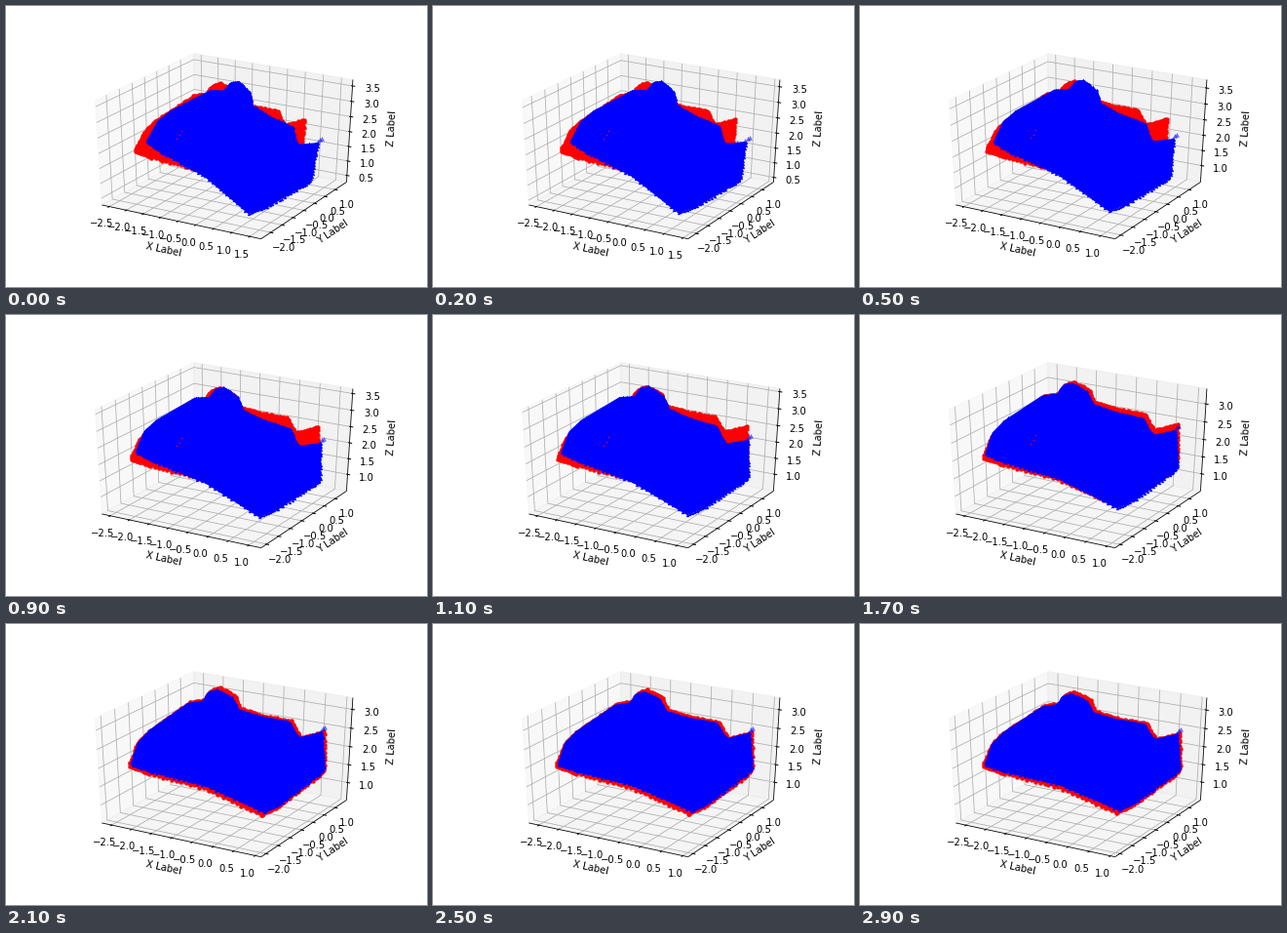
Recreate the animation shown at these times as a matplotlib script. Size 432 by 288 pixels, loop 3 s.

```python
import numpy as np
import matplotlib.pyplot as plt
from matplotlib.animation import FuncAnimation

W, H, FRAMES = 432, 288, 30
ALIGNED = 21  # step at which both clouds lie on each other

fig = plt.figure(figsize=(W / 72, H / 72), dpi=72, facecolor="white")
ax = fig.add_axes([0, 0, 1, 1])

# Axis limits (low, high) at a few steps
STEPS = [0, 5, ALIGNED, 29]
LIMITS = [
    ([-2.63, -2.63, -2.67, -2.68], [1.72, 1.27, 1.06, 1.03]),
    ([-2.34, -2.16, -2.12, -2.12], [1.49, 1.47, 1.46, 1.46]),
    ([0.335, 0.51, 0.555, 0.535], [3.63, 3.69, 3.25, 3.27]),
]

# One silhouette serves both clouds
OUTLINE = np.array([
    (127, 144), (134, 122), (146, 109), (164, 96), (185, 81), (201, 78), (207, 69),
    (216, 66), (232, 74), (238, 86), (262, 94), (292, 100), (297, 110), (303, 117),
    (326, 111), (328, 148), (320, 157), (285, 184), (265, 194), (204, 167), (148, 152),
], float)

# Offsets of the left end, the peak and the right end: at the start, when aligned
ANCHORS = np.array([(127, 144), (215, 66), (326, 111)], float)
BLUE_PATH = np.array([[(16, -5), (23, 10), (-4, 30)], [(0, 0), (0, 0), (0, 0)]], float)
RED_PATH = np.array([[(4, 5), (4, 12), (-18, 6)], [(-2, 2), (3, -2), (2, -0.5)]], float)


def homogeneous(points):
    return np.column_stack([points, np.ones(len(points))])


def carry(points, path, step):
    """Move points by the affine map that the three anchors define."""
    u = min(step / ALIGNED, 1)
    left = np.array([(1 - u) ** 2, 1 - u ** 1.4])
    offsets = path[1] + (path[0] - path[1]) * left
    affine = np.linalg.solve(homogeneous(ANCHORS), offsets)
    moved = points + homogeneous(points) @ affine
    # The view grows a little once the clouds are aligned
    late = max(0, step - ALIGNED) / (FRAMES - 1 - ALIGNED)
    centre = np.array([127, 150])
    return centre + (moved - centre) * (1 + 0.008 * late, 1 - 0.05 * late)


# Perspective view of the unit cube: elevation 30, azimuth -60
ELEV, AZIM, DIST = np.radians(30), np.radians(-60), 10
N = np.array([np.cos(AZIM) * np.cos(ELEV), np.sin(AZIM) * np.cos(ELEV), np.sin(ELEV)])
U = np.array([-np.sin(AZIM), np.cos(AZIM), 0])
V = np.cross(N, U)


def project(points):
    p = np.asarray(points, float) - 0.5
    depth = DIST - p @ N
    x = 54 + (0.095 + p @ U / depth) * 334.8 / 0.185
    y = 252 - (0.095 + p @ V / depth) * 217.44 / 0.185
    return np.stack([x, y], axis=-1)


DELTA = 1 / 12
LO, HI = -DELTA / 4, 1 + DELTA / 4
PER_POINT = 48 / (334.8 + 217.44)
TICK_PAD = 11.5 * PER_POINT * DELTA
LABEL_PAD = 25 * PER_POINT * DELTA

# axis, position and grey of each back pane
PANES = [(0, LO, 0.95), (1, HI, 0.90), (2, LO, 0.925)]
# name, fixed corner of the axis edge, tick direction, tick sign, grid path
AXES = [
    ("X Label", (0, LO, LO), 1, 1, [(0, HI, HI), (0, HI, LO), (0, LO, LO)]),
    ("Y Label", (HI, 0, LO), 0, -1, [(LO, 0, HI), (LO, 0, LO), (HI, 0, LO)]),
    ("Z Label", (HI, HI, 0), 0, -1, [(LO, LO, 0), (LO, HI, 0), (HI, HI, 0)]),
]


def at(points, axis, value):
    p = np.array(points, float)
    p[..., axis] = value
    return p


def outward(point, axis, pad):
    """Move a point away from the cube's centre, except along its axis."""
    step = np.where(point > 0.5, pad, -pad)
    step[axis] = 0
    return point + step


def line(points, color, width):
    ax.plot(*project(points).T, color=color, lw=width, solid_capstyle="butt")


def draw_pane(axis, position, shade):
    square = np.array([(LO, LO), (HI, LO), (HI, HI), (LO, HI)])
    corners = np.insert(square, axis, position, axis=1)
    ax.fill(*project(corners).T, fc=str(shade), ec=str(shade), alpha=0.5, lw=1)


def draw_axis(axis, lo, hi):
    name, corner, side, sign, grid = AXES[axis]
    ends = [at(corner, axis, LO), at(corner, axis, HI)]
    line(ends, "black", 0.8)

    (x0, y0), (x1, y1) = project(ends)
    angle = np.degrees(np.arctan2(y0 - y1, x1 - x0)) % 180
    if angle > 90:
        angle -= 180
    x, y = project(outward(at(corner, axis, 0.5), axis, LABEL_PAD))
    ax.text(x, y, name, rotation=angle, ha="center", va="center")

    ticks = np.arange(np.ceil(lo * 2), np.floor(hi * 2) + 1) / 2
    for value in ticks:
        spot = (value - lo) / (hi - lo)
        line(at(grid, axis, spot), "#b0b0b0", 0.8)
        base = at(corner, axis, spot)
        a = at(base, side, base[side] + 0.1 * sign * DELTA)
        b = at(base, side, base[side] - 0.2 * sign * DELTA)
        line([a, b], "black", 1.0)
        x, y = project(outward(base, axis, TICK_PAD))
        ax.text(x, y, f"{value:.1f}".replace("-", "\u2212"), ha="center", va="top")


def draw_cloud(outline, color, marker, size, layer):
    """Filled outline with a slightly rough rim of markers."""
    rng = np.random.default_rng(layer)
    nxt = np.roll(outline, -1, axis=0)
    u = np.arange(12)[None, :, None] / 12
    rim = (outline[:, None] * (1 - u) + nxt[:, None] * u).reshape(-1, 2)
    inward = rim.mean(axis=0) - rim
    rim += 1.6 * inward / np.linalg.norm(inward, axis=1, keepdims=True)
    ax.fill(*rim.T, color=color, lw=1.5, joinstyle="round", zorder=layer)
    rim += rng.uniform(-0.6, 0.6, rim.shape)
    ax.scatter(*rim.T, s=size, c=color, marker=marker, lw=0.3, zorder=layer)


def draw(step):
    ax.clear()
    ax.set_xlim(0, W)
    ax.set_ylim(H, 0)
    ax.axis("off")

    for pane in PANES:
        draw_pane(*pane)
    for axis, (lows, highs) in enumerate(LIMITS):
        draw_axis(axis, np.interp(step, STEPS, lows), np.interp(step, STEPS, highs))

    draw_cloud(carry(OUTLINE, RED_PATH, step), "red", "o", 16, 5)
    draw_cloud(carry(OUTLINE, BLUE_PATH, step), "blue", "^", 9, 6)

    # Loose points at the right end, and gaps where red shows through
    tips = carry(np.array([(325, 107), (327, 106), (323, 110)]), BLUE_PATH, step)
    ax.scatter(*tips.T, s=16, c="blue", marker="^", alpha=0.5, lw=0.5, zorder=7)
    if step < ALIGNED - 2:
        gaps = carry(np.array([(178, 126), (176, 130), (180, 121)]), RED_PATH, step)
        ax.scatter(*gaps.T, s=2, c="red", lw=0, zorder=7)
    return []


anim = FuncAnimation(fig, draw, frames=FRAMES, interval=100,
                     init_func=lambda: [], repeat=True, repeat_delay=0)
plt.show()
```
